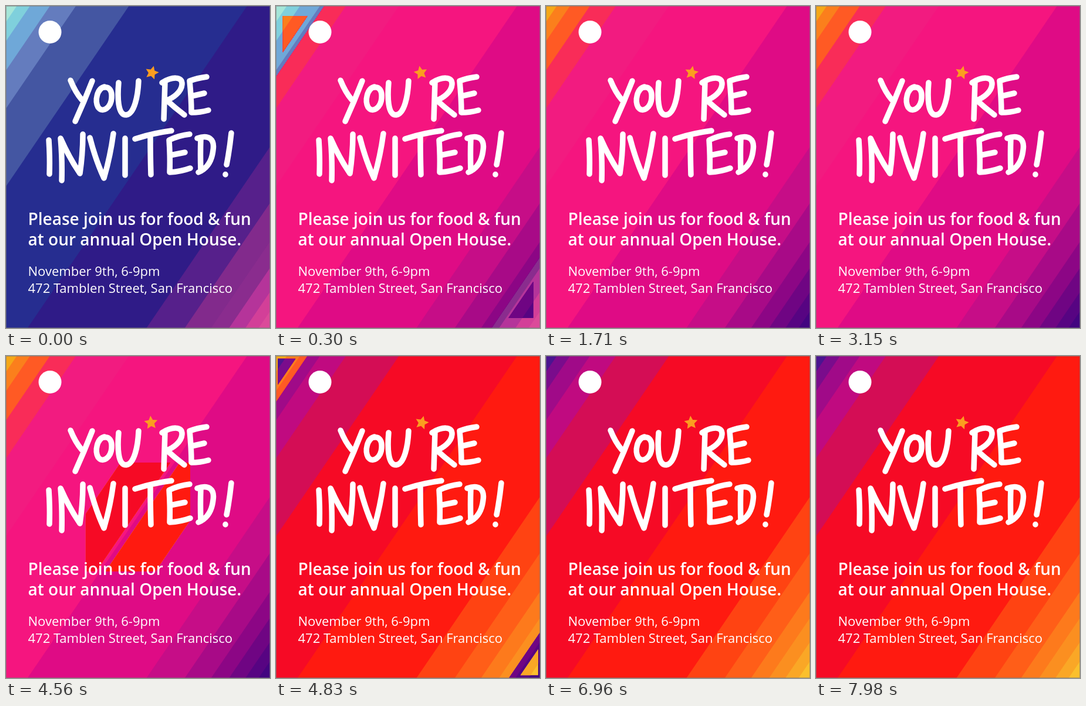
Recreate the animation shown at these times as an HTML page with a canvas. Size 450 px wide and 550 px high, loop 8 s.

```html
<!DOCTYPE html>
<html lang="en">
<head>
<meta charset="utf-8">
<title>You're invited</title>
<style>
  html, body { margin: 0; width: 100%; height: 100%; overflow: hidden; }
  canvas, svg { position: absolute; left: 0; top: 0; width: 450px; height: 550px; display: block; }
  .lettering { fill: none; stroke: #fff; stroke-width: 9.5; stroke-linecap: round; stroke-linejoin: round; }
  text { fill: #fff; font-family: "Open Sans", "Noto Sans", sans-serif; }
  .lead { font-size: 28px; font-weight: 600; }
  .detail { font-size: 22px; }
</style>
</head>
<body>
<canvas id="stage" width="450" height="550"></canvas>
<svg viewBox="0 0 450 550">
  <circle cx="75" cy="44.5" r="19.5" fill="#fff"/>
  <g class="lettering" role="img" aria-label="You're invited!">
    <path d="M110 127Q118 147 129 160M147 128Q133 164 118 197"/>
    <path d="M168 138C155 141 151 162 157 173C165 184 179 173 180 157C181 145 176 137 167 139"/>
    <path d="M192 131C190 154 190 187 205 186C219 184 225 153 226 128"/>
    <path d="M271 130Q270 162 269 193M266 131C282 121 301 119 300 134C299 147 285 157 274 161Q288 174 304 186"/>
    <path d="M342 121Q326 123 313 128Q316 158 316 182Q331 182 345 178M316 154L338 149"/>
    <path d="M73 229Q75 259 74 287"/>
    <path d="M95 298Q96 260 93 226Q108 260 126 286Q131 252 131 219"/>
    <path d="M143 225Q153 264 167 294Q178 256 183 218"/>
    <path d="M203 226V289"/>
    <path d="M220 227Q251 217 282 213M246 223Q246 257 247 288"/>
    <path d="M313 219Q295 221 278 229Q280 257 279 284Q298 283 314 277M280 255L305 250"/>
    <path d="M332 226Q331 254 332 281M326 226C345 219 356 227 353 246C351 265 342 278 328 284"/>
    <path d="M384 217Q381 246 376 271M374 287.500v.5"/>
  </g>
  <g class="lead">
    <text x="37.500" y="374">Please join us for food &amp; fun</text>
    <text x="37.500" y="409">at our annual Open House.</text>
  </g>
  <g class="detail">
    <text x="37.500" y="461">November 9th, 6-9pm</text>
    <text x="37.500" y="490">472 Tamblen Street, San Francisco</text>
  </g>
  <path id="star" fill="#fb9d20"/>
  <rect x=".5" y=".5" width="449" height="549" fill="none" stroke="#777" stroke-opacity=".55"/>
</svg>
<script>
const LOOP = 8000, WIDTH = 450, HEIGHT = 550, SLOPE = 1.47;
const ctx = document.getElementById('stage').getContext('2d');
const star = document.getElementById('star');

// Band edges measured along SLOPE * x + y.
const EDGES = [27, 60, 110, 175, 308, 604, 902, 998, 1064, 1109, 1150, 1183, 1230];
const palette = list => list.split(' ').map(c => '#' + c);
const THEMES = [
  palette('a5e6d8 7fd0dc 6fa8d8 647cbe 4456a2 262d90 2f1b87 56208b 822a8c 8a2c8e b5349a d33f98 dc4a9a'),
  palette('f5a817 fb7f1c ff5a24 f92c58 f21b80 f5157f df0b85 c60d87 a80a87 8c0685 6f0583 570482 430480'),
  palette('4b1590 7a0c8c a00a88 c00a80 d40d55 f60a25 ff1a10 ff4312 ff5e18 fd7a1c fb8f20 faa726 fbc02d')
];
const WIPE_STARTS = [10, 4490], WIPE_LENGTH = 460;

function drawBands(colors) {
  for (let i = EDGES.length - 1; i >= 0; i--) {
    ctx.fillStyle = colors[i];
    ctx.beginPath();
    ctx.moveTo(0, 0);
    ctx.lineTo(EDGES[i] / SLOPE, 0);
    ctx.lineTo(0, EDGES[i]);
    ctx.fill();
  }
}

function tween(t, keys) {
  for (let i = 1; i < keys.length; i++) {
    const [t0, v0] = keys[i - 1], [t1, v1] = keys[i];
    if (t <= t1) return v0 + (v1 - v0) * (t - t0) / (t1 - t0);
  }
  return keys[keys.length - 1][1];
}

// Adds a polygon and its half-turn copy around the stage centre.
function addPair(points) {
  for (const sign of [1, -1]) {
    points.forEach(([x, y], i) =>
      ctx[i ? 'lineTo' : 'moveTo'](WIDTH / 2 + sign * x, HEIGHT / 2 + sign * y));
    ctx.closePath();
  }
}

function clipWipe(t) {
  const w = tween(t, [[0, 0], [70, 88], [300, 326], [WIPE_LENGTH, 398]]);
  const h = w * 1.045, cut = w * 1.53;
  const gap = tween(t, [[0, 0], [70, 12], [200, -1]]);
  ctx.beginPath();
  addPair([
    [(h - cut) / SLOPE, -h], [(h - gap) / SLOPE, -h],
    [(-h - gap) / SLOPE, h], [-w, h], [-w, SLOPE * w - cut]
  ]);

  // Corner pieces follow once the centre piece has outgrown them.
  const inset = tween(t, [[0, 60], [300, 10], [360, 0]]);
  const cw = WIDTH / 2 - inset, ch = HEIGHT / 2 - inset * 1.5;
  const outer = cut + 25;
  if (w > cw && SLOPE * cw + ch > outer) {
    addPair([[-cw, -ch], [(ch - outer) / SLOPE, -ch], [-cw, SLOPE * cw - outer]]);
  }
  ctx.clip();
}

function drawBackground(t) {
  const step = t >= WIPE_STARTS[1] ? 1 : 0;
  const age = t - WIPE_STARTS[step];
  if (age >= WIPE_LENGTH) return drawBands(THEMES[step + 1]);
  drawBands(THEMES[step]);
  if (age <= 0) return;
  ctx.save();
  clipWipe(age);
  drawBands(THEMES[step + 1]);
  ctx.restore();
}

function starPath() {
  const points = Array.from({ length: 10 }, (_, i) => {
    const r = i % 2 ? 5.8 : 12, a = i * Math.PI / 5;
    return `${(r * Math.sin(a)).toFixed(2)} ${(-r * Math.cos(a)).toFixed(2)}`;
  });
  return 'M' + points.join('L') + 'Z';
}
star.setAttribute('d', starPath());

function render(t) {
  drawBackground(t);
  const swing = Math.cos(t / 800 * 2 * Math.PI);
  star.setAttribute('transform',
    `translate(${247.5 + 1.2 * swing} 114) rotate(${15 * swing})`);
}

const start = performance.now();
function tick() {
  render((performance.now() - start) % LOOP);
  requestAnimationFrame(tick);
}
render(0);
requestAnimationFrame(tick);
</script>
</body>
</html>
```
